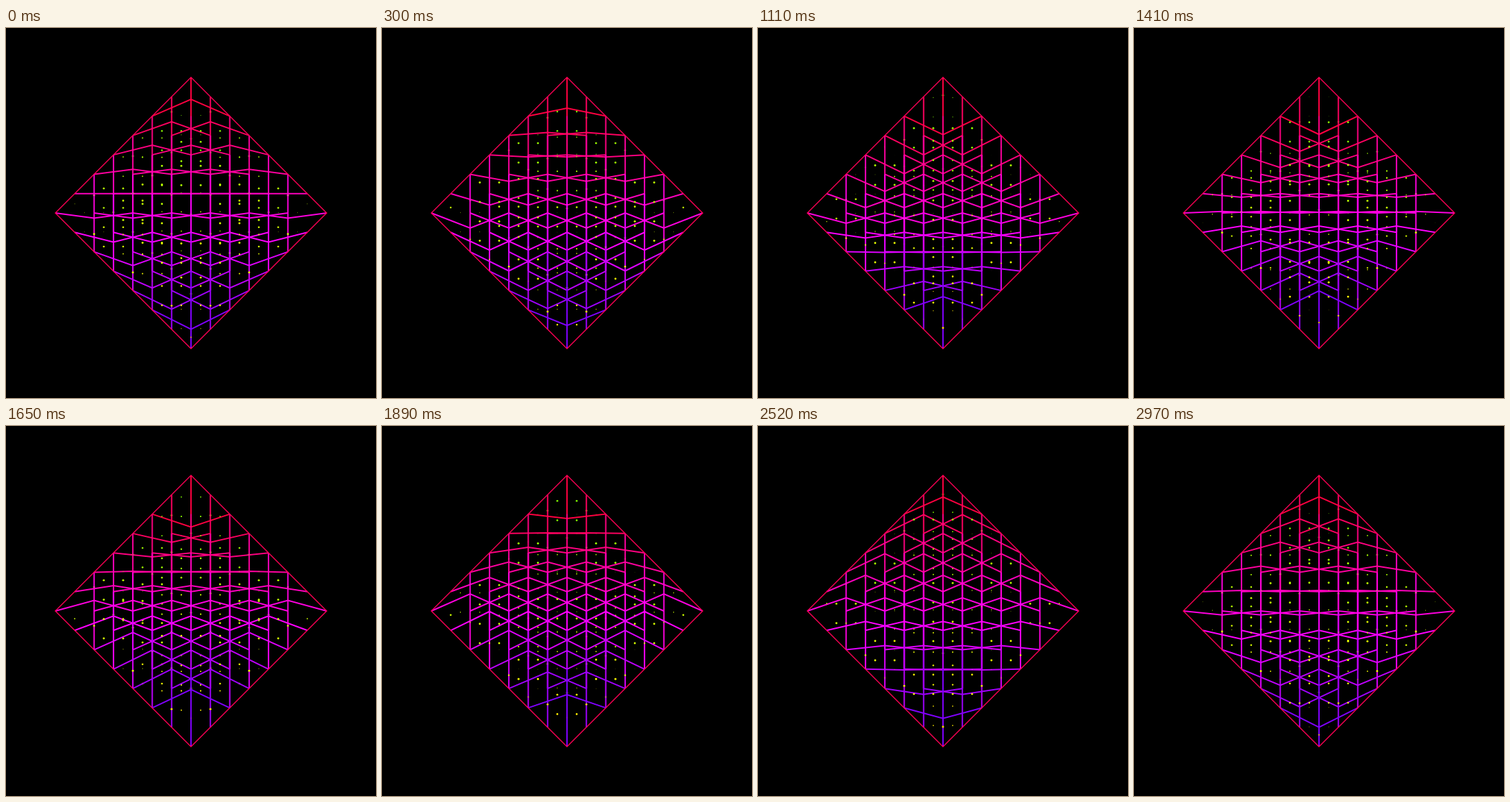
Recreate the animation shown at these times as an HTML page with a canvas. Size 540 by 540 pixels, loop 3 s.

```html
<!DOCTYPE html>
<html>
<head>
<meta charset="utf-8">
<style>
html, body { margin: 0; height: 100%; background: #000; overflow: hidden; }
canvas { display: block; }
</style>
</head>
<body>
<canvas id="c" width="540" height="540"></canvas>
<script>
const g = document.getElementById('c').getContext('2d');
const LOOP = 3000, MID = 270;
const U = 20 * Math.SQRT2;      // half diagonal of one grid cell
const HALF = 7 * U;             // half diagonal of the whole diamond
const rad = deg => deg * Math.PI / 180;

function path(color, width, points, close) {
  g.strokeStyle = color;
  g.lineWidth = width;
  g.beginPath();
  for (const [x, y] of points) g.lineTo(x, y);
  if (close) g.closePath();
  g.stroke();
}

// A dot that bobs vertically and shrinks away at its turning points.
function dot(x, y, phase, row) {
  g.fillStyle = `hsl(${90 - 3.5 * row},100%,50%)`;
  g.beginPath();
  g.arc(x, y + U / 2 * Math.sin(phase), 1.5 * Math.abs(Math.cos(phase)), 0, 7);
  g.fill();
}

// Folding square two cells wide, centred on a grid vertex.
function fold(i, j, turn) {
  const row = i + j;
  const x = MID + (i - j) * U, y = MID + (row - 5) * U;
  const tip = y + U * Math.sin(rad(15 * (row - 4) + turn));
  const color = `hsl(${345 - 7.5 * row},100%,50%)`;
  path(color, 2, [[x, y - 2 * U], [x, y + 2 * U]]);
  path(color, 2, [[x - 2 * U, y], [x, tip], [x + 2 * U, y]]);

  const phase = rad(92 - 112 * (i - 2.5) * (j - 2.5) + turn);
  for (const dx of [-U / 2, U / 2])
    for (const dy of [-U / 2, U / 2]) dot(x + dx, y + dy, phase, row);
}

function draw(now) {
  const turn = now % LOOP / LOOP * 360;
  g.fillStyle = '#000';
  g.fillRect(0, 0, 540, 540);
  for (let i = 0; i < 7; i++)
    for (let j = 0; j < 7; j++) {
      const phase = rad(172 - 93 * (i - 3) * (j - 3) + turn);
      dot(MID + (i - j) * U, MID + (i + j - 6) * U, phase, i + j - 1);
      if (i < 6 && j < 6) fold(i, j, turn);
    }
  path('#f05', 1.4, [[MID, MID - HALF], [MID + HALF, MID],
    [MID, MID + HALF], [MID - HALF, MID]], true);
}

const start = performance.now();
function tick() {
  draw(performance.now() - start);
  requestAnimationFrame(tick);
}
tick();
</script>
</body>
</html>
```
